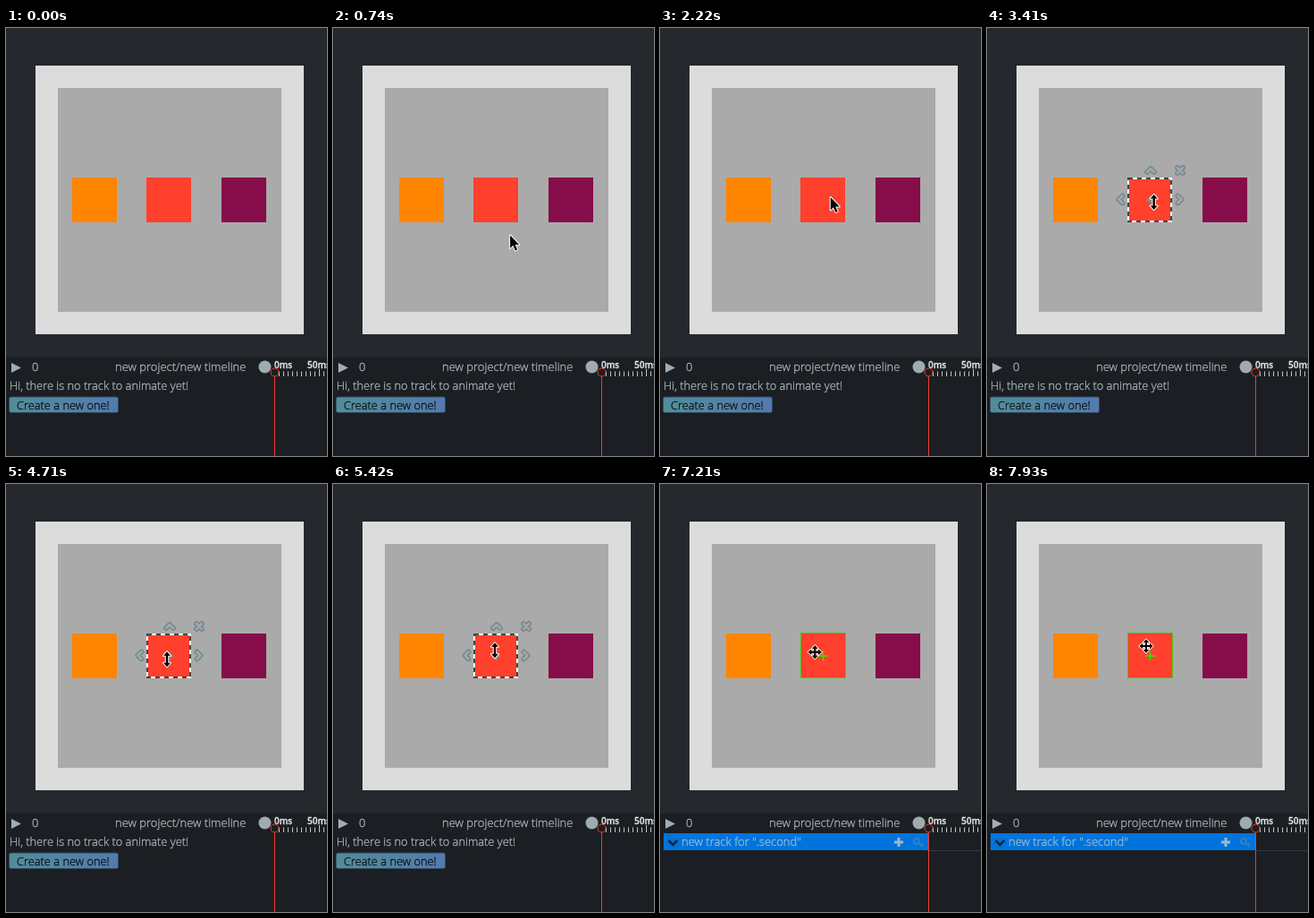
Animation, 359 px wide and 478 px high, one loop 7.99 s. Source, as an HTML page:

```html
<!DOCTYPE html>
<html lang="en">
<head>
<meta charset="utf-8">
<title>Timeline editor</title>
<style>
  html, body { margin: 0; width: 100%; height: 100%; overflow: hidden; background: #25282d; }
  svg { display: block; width: 359px; height: 478px; }
  text { font: 300 13px "Open Sans", sans-serif; color: #a9b7bc; fill: currentColor; stroke: currentColor; stroke-width: .3; }
  #empty text { font-size: 12.85px; }
  #ruler text { font-size: 10px; font-weight: 600; color: #e4e7e8; text-anchor: middle; }
  .control path { fill: none; stroke: #7b8b8e; stroke-width: 6; stroke-linecap: round; stroke-linejoin: round; }
  .control path + path { stroke: #a2adb0; stroke-width: 2.4; }
  .cursor path { stroke: #fff; stroke-width: 2; paint-order: stroke; stroke-linejoin: round; }
</style>
</head>
<body>
<svg viewBox="0 0 359 478">
  <defs>
    <linearGradient id="buttonFill">
      <stop offset="0" stop-color="#528d9a"/>
      <stop offset="1" stop-color="#537aae"/>
    </linearGradient>
  </defs>

  <rect width="359" height="478" fill="#25282d"/>
  <rect x="33" y="42" width="300" height="300" fill="#dcdcdc"/>
  <rect x="58" y="67" width="250" height="250" fill="#aaa"/>
  <rect x="74" y="167" width="50" height="50" fill="#ff8500"/>
  <rect x="157" y="167" width="50" height="50" fill="#ff402c"/>
  <rect x="241" y="167" width="50" height="50" fill="#860d49"/>

  <rect y="368" width="359" height="110" fill="#1b1e22"/>
  <path d="M6 374L17 379.5L6 385Z" fill="#a0aeb2"/>
  <text x="29" y="383">0</text>
  <text x="122" y="383">new project/new timeline</text>

  <g id="empty">
    <text x="4" y="404">Hi, there is no track to animate yet!</text>
    <rect x="3.5" y="412" width="122" height="17.5" rx="2" fill="url(#buttonFill)" stroke="#31495c"/>
    <text x="12" y="426" style="color:#0b1014">Create a new one!</text>
  </g>

  <g id="track">
    <rect x="4" y="390" width="296" height="19" fill="#0074dc"/>
    <path d="M9.5 398L14.5 403L19.5 398" fill="none" stroke="#10263b" stroke-width="2.6"/>
    <text x="24" y="404" style="color:#9bbcd3">new track for ".second"</text>
    <path d="M262 400H272M267 395V405" stroke="#a0b9c9" stroke-width="3"/>
    <g fill="none" stroke="#3f83bd" stroke-width="1.5">
      <circle cx="287" cy="399" r="3"/>
      <path d="M289 401L294 405M292 403L294 401"/>
    </g>
    <path d="M301 409.5H359" stroke="#34373b"/>
  </g>

  <g id="ruler">
    <path id="ticks" stroke="#bfc4c6"/>
    <text x="310" y="380">0ms</text>
    <text x="350" y="380">50ms</text>
  </g>
  <circle cx="289.5" cy="378.5" r="7" fill="#9eabb0"/>
  <g fill="none" stroke="#f33b2b">
    <circle cx="300.5" cy="384.5" r="4.5"/>
    <path d="M300.5 389V478"/>
  </g>

  <g id="selection" fill="none" stroke-width="2">
    <rect x="158" y="168" width="48" height="48" stroke="#444"/>
    <rect x="158" y="168" width="48" height="48" stroke="#fff" stroke-dasharray="5" stroke-dashoffset="5"/>
    <g id="controls"></g>
    <path d="M178 192H187M182.5 187.5V196.5" stroke="#94867f" stroke-width="3"/>
  </g>

  <g id="outline" fill="none" stroke="#52c40d">
    <rect x="157.5" y="166.5" width="50" height="50"/>
    <path d="M177 192H188M182.5 186.5V197.5" stroke="#2bea00" stroke-width="1.5"/>
  </g>

  <g id="cursor" class="cursor">
    <path id="arrow" d="M1 1V15.5L4.2 12.4L6.8 18L9 17L6.5 11.5H11Z"/>
    <path id="resize" d="M0-8L4-3.5H1.2V4.5H4L0 9L-4 4.5H-1.2V-3.5H-4Z"/>
    <g id="move"></g>
  </g>
</svg>

<script>
const LOOP = 7990;
const ENTER = 500, SELECT = 2640, CREATE = 6130, HOVER = 6310;
const el = id => document.getElementById(id);
const show = (id, on) => el(id).setAttribute("visibility", on ? "visible" : "hidden");

// Pointer gestures: start, end, target x, target y
const gestures = [
  [ENTER, 1260, 191, 190],
  [2190, 2340, 185, 187],
  [SELECT, 2690, 187, 194],
  [3390, 3640, 183, 194],
  [3810, 4230, 175, 194],
  [4520, 4710, 180, 195],
  [4710, 5310, 181, 184],
  [5410, 5770, 180, 193],
  [CREATE, 6430, 178, 188],
  [7200, 7750, 178, 185],
  [7910, 7930, 178, 181]
];

const progress = (t, from, to) => Math.min(1, Math.max(0, (t - from) / (to - from)));
const easeOut = k => 1 - (1 - k) ** 5;
const swing = (t, from, to) => Math.sin(Math.PI * progress(t, from, to));

function positionAt(t) {
  let x = 200, y = 462;
  for (const [from, to, toX, toY] of gestures) {
    const k = progress(t, from, to);
    x += (toX - x) * k;
    y += (toY - y) * easeOut(k);
  }
  // Two there-and-back excursions: below the square, then over to the left one
  return [x - 76 * swing(t, 7200, 7750), y + 45 * swing(t, 4710, 5310)];
}

function cursorAt(t, x) {
  if (t < 2690) return "arrow";
  if (t < HOVER) return "resize";
  return x < 157 ? "arrow" : "move";
}

function build() {
  let ticks = "";
  for (let x = 305.5; x < 359; x += 5) ticks += `M${x} ${x === 350.5 ? 381 : 383.5}V389`;
  el("ticks").setAttribute("d", ticks);

  const control = (x, y, d) =>
    `<g class="control" transform="translate(${x} ${y})"><path d="${d}"/><path d="${d}"/></g>`;
  const chevron = "M-4 2L0-2L4 2";
  el("controls").innerHTML =
    control(183, 159, chevron) +
    control(216, 159, "M-3-3L3 3M3-3L-3 3") +
    control("149.5 191.5) rotate(-90", "", chevron) +
    control("215.5 191.5) rotate(90", "", chevron);

  const arms = style => [0, 90, 180, 270].map(angle =>
    `<path d="M-1 0V-4H-3L0-7.5L3-4H1V0Z" transform="rotate(${angle})" style="${style}"/>`).join("");
  el("move").innerHTML = arms("") + arms("stroke:none");
}

function render(t) {
  const [x, y] = positionAt(t);
  const kind = cursorAt(t, x);
  el("cursor").setAttribute("transform", `translate(${x} ${y})`);
  for (const id of ["arrow", "resize", "move"]) show(id, t >= ENTER && id === kind);

  const created = t >= CREATE;
  show("empty", !created);
  show("track", created);
  show("selection", t >= SELECT && !created);
  show("outline", t >= HOVER);
}

build();
const start = performance.now();
function frame() {
  render((performance.now() - start) % LOOP);
  requestAnimationFrame(frame);
}
frame();
</script>
</body>
</html>
```
